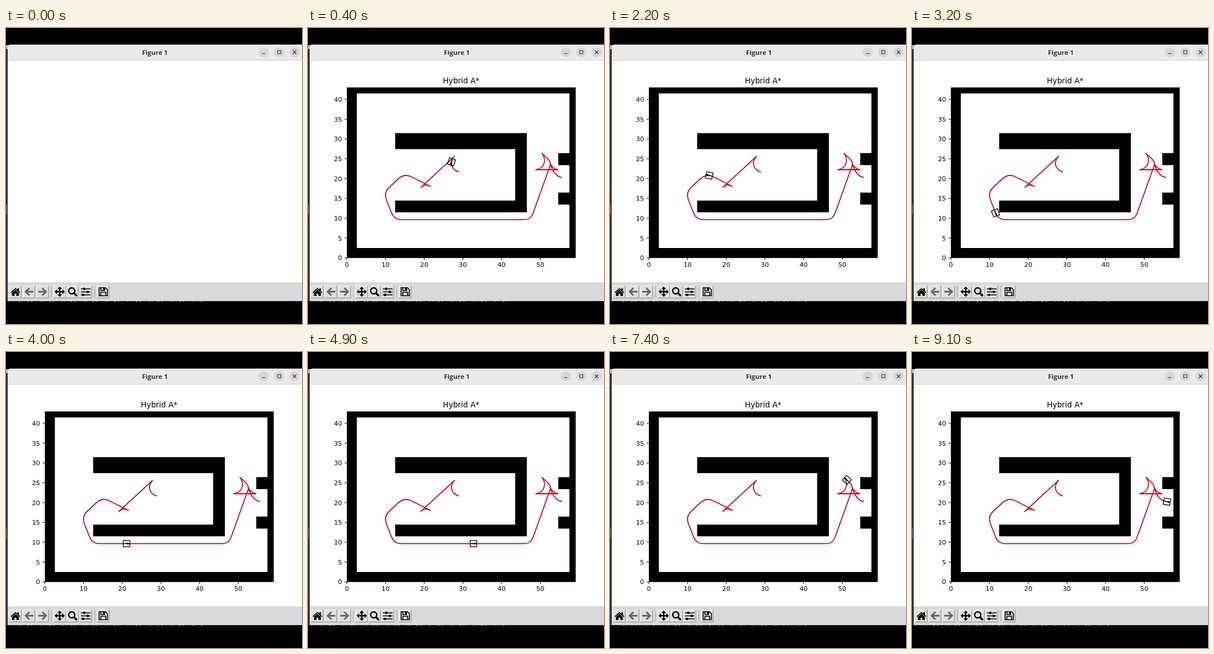
Write an HTML page that moves like this. It is 518 px wide and 518 px high and loops after 9700 ms.

```html
<!DOCTYPE html>
<html lang="en">
<head>
<meta charset="utf-8">
<title>Hybrid A*</title>
<style>
html, body { margin: 0; width: 100%; height: 100%; overflow: hidden; background: #000; }
svg { display: block; width: 100vw; height: 100vh; }
text { font-family: "DejaVu Sans", sans-serif; font-size: 11.1px; }
</style>
</head>
<body>
<svg id="stage" viewBox="0 0 518 518">
  <!-- window -->
  <path fill="#29303c" d="M0 30h4v448H0z"/>
  <path fill="#b5b5b5" d="M0 30h5v7H0z"/>
  <path fill="#a8623a" d="M0 309h1.5v17H0z"/>
  <path fill="#ebe9e8" d="M3 57V34q0-5 5-5H518V57z"/>
  <path stroke="#d2d0cf" d="M3 56.5H518"/>
  <text x="260.5" y="47" text-anchor="middle" fill="#333" style="font:bold 11.4px 'Open Sans',sans-serif">Figure 1</text>
  <g fill="#d9d7d5"><circle cx="451" cy="42.5" r="9"/><circle cx="478" cy="42.5" r="9"/><circle cx="505" cy="42.5" r="9"/></g>
  <path fill="none" stroke="#333" stroke-width="1.1" d="M448 44.8h6M475.5 39.5h5.5v5.5h-5.5zM502 39.5l6 6m0-6l-6 6"/>
  <path fill="#fff" d="M3 57H518V445H3z"/>
  <path fill="#d9d9d9" d="M3 445H518V478H3z"/>
  <path stroke="#666" stroke-width="1.5" stroke-dasharray="2 3 1 9 3 4 2 14" d="M22 478.7H345"/>

  <!-- toolbar -->
  <g id="buttons"></g>
  <path stroke="#aaa" d="M79.5 452v20M155.5 452v20"/>
  <path d="M8 462.5l8.500-7.500 3.500 3v-2.500h2.500v4.700l2.500 2.300-1.200 1.200-7.300-6.400-7.300 6.400zM10.500 463.500l6-5.200 6 5.200v5.500h-4.300v-4h-3.400v4h-4.300z"/>
  <path id="arrow" fill="none" stroke="#666" stroke-width="3" d="M41 455l-6.500 6.500 6.500 6.500M35 461.500h13"/>
  <use href="#arrow" transform="matrix(-1 0 0 1 104.500 0)"/>
  <path d="M94 452.500l4 4.200h-2.800v3.600h3.600v-2.800l4.200 4-4.200 4v-2.800h-3.600v3.600h2.800l-4 4.200-4-4.200h2.800v-3.600h-3.600v2.800l-4.200-4 4.200-4v2.800h3.600v-3.600h-2.800z"/>
  <g fill="none" stroke="#000">
    <circle cx="115" cy="460" r="5.300" stroke-width="2.400"/>
    <path stroke-width="3.200" d="M119 464l5 5"/>
    <path stroke-width="1.600" d="M131 456.500h17M131 461.700h17M131 467h17"/>
    <path stroke-width="3.400" d="M137 454.500v4M143 459.700v4M135 465v4"/>
    <path stroke-width="1.600" d="M163 454.500h11l3.500 3.500v10.500H163zM166 468v-5.500h8.500v5.500M166 455v4.500h6.500V455"/>
    <path stroke-width="2.200" d="M170.800 455v3.500"/>
  </g>

  <!-- figure -->
  <g id="plot">
    <text x="268" y="97" text-anchor="middle" style="font-size:13.3px">Hybrid A*</text>
    <path fill-rule="evenodd" d="M68 104H468.500V402.500H68zM85.500 114.500V385H457.500V114.500z"/>
    <path d="M152.500 184H383V322.500H152.500V302H362.500V212H152.500zM438 219h20v21h-20zM438 288h20v21h-20z"/>
    <g id="ticks"></g>
    <path id="route" fill="none" stroke="#c00d20" stroke-width="1.800"/>
    <g id="car" fill="none" stroke="#000" stroke-width="1.300">
      <path d="M-3.500 -5.600H8V5.600H-3.500z"/>
      <path stroke-width="1.500" d="M-1 0H7"/>
      <path fill="#000" stroke="none" d="M8.500 0L4-2V2z"/>
    </g>
  </g>
  <g id="mouse">
    <path fill="#333" stroke="#ddd" stroke-width=".6" d="M401 170v13.500l3-2.700 2.200 5 2-.9-2.200-4.900h3.800z"/>
    <text x="510" y="465" text-anchor="end" style="font-size:10.1px">x=49.2 y=33.3</text>
  </g>
</svg>
<script>
const $ = id => document.getElementById(id);

$('buttons').innerHTML = [5, 29, 53, 83, 105.5, 128.5, 159].map(x =>
  `<path fill="#dedede" d="M${x} 451h22v22h-22z"/>
   <path fill="none" stroke="#f6f6f6" d="M${x + .5} 473v-21.500h21.500"/>
   <path fill="none" stroke="#8c8c8c" d="M${x} 472.500h21.500v-21.500"/>`).join('');

let ticks = '';
for (let i = 0; i < 6; i++) {
  const x = 68 + 67.7 * i;
  ticks += `<path stroke="#000" d="M${x} 402v4"/><text x="${x}" y="418" text-anchor="middle">${i * 10}</text>`;
}
for (let i = 0; i < 9; i++) {
  const y = 402.3 - 34.68 * i;
  ticks += `<path stroke="#000" d="M64 ${y}h4"/><text x="59.500" y="${y + 4}" text-anchor="end">${i * 5}</text>`;
}
$('ticks').innerHTML = ticks;

// Each leg: path, driving direction (1 forward, -1 reverse), end time
const START = 100, LOOP = 9700;
const legs = [
  ['M264.5 252C253 249 245 237 257 224', -1, 510],
  ['M257 224L197 279.5', 1, 1465],
  ['M197 279.5C202 274.5 207 273 215 277.5', -1, 1700],
  ['M215 277.5L181 260.500Q170 254.500 159 263L141 280Q133 288 137 300L146 323' +
   'Q150.500 335.300 163 335.300H379Q390 335.300 394 324L423 243C427 233 420 229 409 219', 1, 7510],
  ['M409 219C415 224 419 245 398 248', -1, 7970],
  ['M398 248H438', 1, 8455],
  ['M438 248C432 248 426 242 423.500 236.500', -1, 8690],
  ['M423.500 236.500C427 247 432 259.500 444 261.500', 1, 9100]
].map(([d, dir, end], i, all) => {
  const path = document.createElementNS('http://www.w3.org/2000/svg', 'path');
  path.setAttribute('d', d);
  return { d, dir, end, path, start: i ? all[i - 1][2] : START, length: path.getTotalLength() };
});
$('route').setAttribute('d', legs.map(leg => leg.d).join(''));

function drive(t) {
  const { path, dir, start, end, length } = legs.find(leg => t <= leg.end) || legs[legs.length - 1];
  const s = length * Math.min(1, (t - start) / (end - start));
  const p = path.getPointAtLength(s);
  const a = path.getPointAtLength(Math.max(0, s - .5));
  const b = path.getPointAtLength(Math.min(length, s + .5));
  const angle = Math.atan2(dir * (b.y - a.y), dir * (b.x - a.x)) * 180 / Math.PI;
  $('car').setAttribute('transform', `translate(${p.x} ${p.y}) rotate(${angle})`);
}

const show = (id, on) => $(id).setAttribute('visibility', on ? 'visible' : 'hidden');

const origin = performance.now();
function frame() {
  const t = Math.floor((performance.now() - origin) % LOOP / 100) * 100;
  show('plot', t >= START);
  show('mouse', t >= 600 && t < 1500);
  if (t >= START) drive(t);
  requestAnimationFrame(frame);
}
frame();
</script>
</body>
</html>
```
